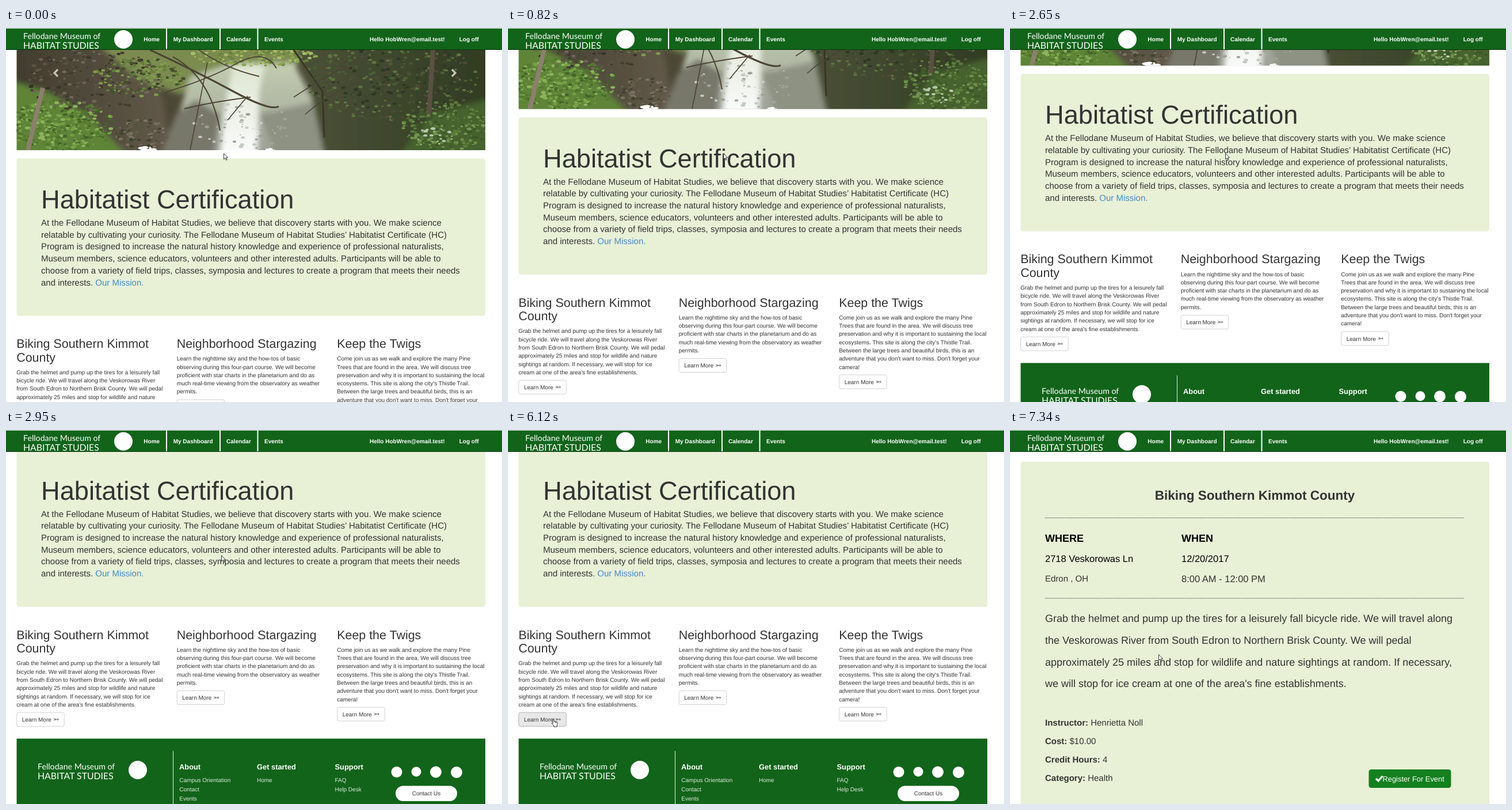
An HTML page that plays this animation: 862 px wide and 649 px high, repeating every 8000 ms.

```html
<!DOCTYPE html>
<html lang="en">
<head>
<meta charset="utf-8">
<title>Museum site tour</title>
<style>
  html, body { margin: 0; width: 100%; height: 100%; overflow: hidden; background: #fff; }
  svg { display: block; width: 862px; height: 649px; }
  text { font-family: "Liberation Sans", Arial, sans-serif; fill: #333; text-rendering: geometricPrecision; white-space: pre; }
  .bold { font-weight: 700; }
  .white { fill: #fff; }
  .pale { fill: #dfeadf; }
  .black { fill: #000; }
  .brand { font-family: Lato, sans-serif; fill: #fff; }
  .link { fill: #428bca; }
</style>
</head>
<body>
<svg id="stage" viewBox="0 0 862 649"></svg>
<script>
const GREEN = '#12641a', CREAM = '#e8f0d6', LOOP = 8000;

const text = (x, y, size, str, cls = '') =>
  `<text x="${x}" y="${y}" font-size="${size}" class="${cls}">${str}</text>`;
const lines = (x, y, size, step, rows, cls) =>
  rows.map((row, i) => text(x, y + i * step, size, row, cls)).join('');
const rect = (x, y, w, h, fill, extra = '') =>
  `<rect x="${x}" y="${y}" width="${w}" height="${h}" fill="${fill}" ${extra}/>`;
const dot = (x, y, r, fill = '#fff') => `<circle cx="${x}" cy="${y}" r="${r}" fill="${fill}"/>`;
const shape = (d, fill) => `<path d="${d}" fill="${fill}"/>`;
const stroke = (d, color, width, extra = '') =>
  `<path d="${d}" fill="none" stroke="${color}" stroke-width="${width}" ${extra}/>`;

let seed = 7;
const rnd = () => (seed = (seed * 16807) % 2147483647) / 2147483647;

// Elliptical cloud of small leaves
function leaves(cx, cy, rx, ry, count, colors) {
  let out = '';
  for (let i = 0; i < count; i++) {
    const a = rnd() * 2 * Math.PI, r = Math.sqrt(rnd());
    const x = cx + Math.cos(a) * r * rx, y = cy + Math.sin(a) * r * ry;
    const w = 1.2 + rnd() * 3;
    out += `<ellipse cx="${x.toFixed(1)}" cy="${y.toFixed(1)}" rx="${w.toFixed(1)}" ry="${(w * 0.6).toFixed(1)}" fill="${colors[i % colors.length]}"/>`;
  }
  return out;
}

function brand(x, y) {
  return text(x, y, 14.2, 'Fellodane Museum of', 'brand') +
    text(x, y + 17.2, 15.8, 'HABITAT STUDIES', 'brand') + dot(x + 174, y + 1, 16);
}

function photo() {
  const bark = '#4d4536';
  return `<g clip-path="url(#frame)">` +
    rect(19, 0, 814, 212, '#4c4836') +
    `<g filter="url(#soft)">` +
    shape('M0 20H190L270 110L290 225H0Z', 'url(#bank)') +
    shape('M150 20H520L500 85L390 85L300 115L225 85Z', '#7c8b50') +
    shape('M320 85L390 62L500 60L530 120L555 225H268L300 150Z', 'url(#water)') +
    shape('M395 62H450L440 110L436 225H372L380 140Z', 'url(#glow)') +
    shape('M440 150L530 130L555 225H470Z', '#8d9282') +
    shape('M268 225L295 150L330 125L372 150L360 225Z', '#77776a') +
    shape('M500 20H850V225H555L530 120Z', 'url(#shade)') +
    shape('M0 90L70 110L140 150L215 225H0Z', '#5f8437') +
    shape('M680 225L740 150L850 120V225Z', '#47622f') +
    `</g>` +
    leaves(150, 90, 120, 55, 240, ['#39332a', '#5d5344', '#70655a', '#443c2d']) +
    leaves(230, 85, 80, 34, 200, ['#627d3a', '#7f9b4d', '#42502d']) +
    leaves(430, 48, 110, 18, 200, ['#8ba64e', '#a9bc6c', '#6b833c']) +
    leaves(95, 170, 95, 45, 420, ['#75a044', '#52792e', '#8db35c', '#44632b']) +
    leaves(670, 90, 150, 70, 400, ['#4a5e33', '#2e3823', '#5f7440', '#4f4a38']) +
    leaves(765, 170, 75, 45, 260, ['#5a7d3a', '#3b5728', '#719350']) +
    leaves(235, 185, 45, 28, 100, ['#645c4c', '#40432f', '#7b7264']) +
    leaves(415, 170, 90, 40, 60, ['#c5cac3', '#9fa397']) +
    stroke('M38 212L64 104', '#8b806c', 8) +
    stroke('M735 150L742 38', '#5a5140', 8) +
    stroke('M553 190L550 110L500 38', '#3a3528', 3) +
    stroke('M250 38Q330 75 395 110T474 136', bark, 3.2) +
    stroke('M275 112Q350 90 400 62T470 70M290 50Q355 85 372 178M310 140Q360 128 425 120M335 38Q380 70 440 84', bark, 2) +
    stroke('M500 120Q560 80 640 40M520 150Q580 95 700 66M350 60L320 212M420 118L385 160', '#4a4335', 1.6) +
    leaves(740, 188, 45, 16, 22, ['#b9c8ae']) +
    leaves(246, 210, 15, 3, 24, ['#fff']) + leaves(459, 212, 9, 2, 10, ['#fff']) +
    `<circle cx="436" cy="182" r="3.5" fill="none" stroke="#fff" opacity=".7"/>` +
    stroke('M90 72L84 78L90 84', '#c4c4b8', 3.2) + stroke('M775 72L781 78L775 84', '#c4c4b8', 3.2) +
    `</g>`;
}

function button(x, y, id) {
  const m = x + 68;
  return `<rect id="${id}" x="${x}" y="${y}" width="82.5" height="24" rx="3" fill="#fff" stroke="#ccc" stroke-width=".9"/>` +
    text(x + 9, y + 15.8, 10, 'Learn More') +
    stroke(`M${m - 4} ${y + 10}l2 2l-2 2M${m - 2} ${y + 10}l2 2l-2 2M${m - 2} ${y + 12}h6M${m + 2.5} ${y + 10.2}l2.2 1.8l-2.2 1.8`, '#444', 0.8);
}

function card(x, titles, rows, buttonY, id) {
  const top = 577.3 + (titles.length - 1) * 23.6;
  return lines(x, 555, 21.43, 23.6, titles) + lines(x, top, 10, 14.29, rows) +
    button(x + 0.5, buttonY, id);
}

function footer() {
  return rect(18.5, 728, 814.5, 300, GREEN) + brand(55, 781.5) +
    rect(290, 749.5, 1, 200, '#e4ece4') +
    [[301, 'About'], [436, 'Get started'], [571.5, 'Support']]
      .map(([x, s]) => text(x, 781.5, 12.86, s, 'bold white')).join('') +
    lines(301.3, 803, 10, 16.4, ['Campus Orientation', 'Contact', 'Events'], 'pale') +
    text(436, 803, 10, 'Home', 'pale') +
    lines(571.5, 803, 10, 16.4, ['FAQ', 'Help Desk'], 'pale') +
    dot(679, 786, 9.5) + dot(713, 785.5, 8.5) + dot(747, 786, 10) + dot(783, 786.5, 10) +
    rect(677, 810, 107, 26.5, '#fff', 'rx="13.2"') + text(705.7, 826.6, 10, 'Contact Us');
}

function homePage() {
  return photo() + rect(18.5, 226.5, 814.5, 273, CREAM, 'rx="4.5"') +
    text(61, 313, 45.2, 'Habitatist Certification') +
    lines(61, 343, 15, 20.7, [
      'At the Fellodane Museum of Habitat Studies, we believe that discovery starts with you. We make science',
      'relatable by cultivating your curiosity. The Fellodane Museum of Habitat Studies’ Habitatist Certificate (HC)',
      'Program is designed to increase the natural history knowledge and experience of professional naturalists,',
      'Museum members, science educators, volunteers and other interested adults. Participants will be able to',
      'choose from a variety of field trips, classes, symposia and lectures to create a program that meets their needs',
      'and interests. <tspan class="link">Our Mission.</tspan>']) +
    card(18.2, ['Biking Southern Kimmot', 'County'], [
      'Grab the helmet and pump up the tires for a leisurely fall',
      'bicycle ride. We will travel along the Veskorowas River',
      'from South Edron to Northern Brisk County. We will pedal',
      'approximately 25 miles and stop for wildlife and nature',
      'sightings at random. If necessary, we will stop for ice',
      "cream at one of the area's fine establishments."], 682.7, 'more') +
    card(296.7, ['Neighborhood Stargazing'], [
      'Learn the nighttime sky and the how-tos of basic',
      'observing during this four-part course. We will become',
      'proficient with star charts in the planetarium and do as',
      'much real-time viewing from the observatory as weather',
      'permits.'], 645, 'more2') +
    card(575.2, ['Keep the Twigs'], [
      'Come join us as we walk and explore the many Pine',
      'Trees that are found in the area. We will discuss tree',
      'preservation and why it is important to sustaining the local',
      "ecosystems. This site is along the city's Thistle Trail.",
      'Between the large trees and beautiful birds, this is an',
      "adventure that you don't want to miss. Don't forget your",
      'camera!'], 673.5, 'more3') +
    footer();
}

function eventPage() {
  const rule = y => stroke(`M61 ${y}H790`, '#333', 1.2, 'stroke-dasharray="1.43 1.43"');
  const fact = ([name, value]) => `<tspan class="bold">${name}:</tspan> ${value}`;
  return rect(0, 38, 862, 611, '#fff') + rect(18.5, 55, 814.5, 620, CREAM, 'rx="4.5"') +
    `<g text-anchor="middle">${text(425.5, 120.5, 22.5, 'Biking Southern Kimmot County', 'bold')}</g>` +
    rule(152.5) + rule(292) +
    text(61, 193.5, 18, 'WHERE', 'bold black') + text(298, 193.5, 18, 'WHEN', 'bold black') +
    text(61, 229.3, 16.5, '2718 Veskorowas Ln', 'black') + text(298, 229.3, 16.5, '12/20/2017', 'black') +
    text(61, 263, 15, 'Edron , OH') + text(298, 264.3, 16.5, '8:00 AM - 12:00 PM') +
    lines(61, 333, 18, 37.8, [
      'Grab the helmet and pump up the tires for a leisurely fall bicycle ride. We will travel along',
      'the Veskorowas River from South Edron to Northern Brisk County. We will pedal',
      'approximately 25 miles and stop for wildlife and nature sightings at random. If necessary,',
      "we will stop for ice cream at one of the area's fine establishments."]) +
    lines(61, 513, 15, 32.1, [['Instructor', 'Henrietta Noll'], ['Cost', '$10.00'],
      ['Credit Hours', '4'], ['Category', 'Health']].map(fact)) +
    rect(623.5, 589, 143, 32, '#15801f', 'rx="4.3"') +
    stroke('M636 605L640 609L647.5 600.5', '#fff', 3.2) +
    text(647.5, 609.6, 12.86, 'Register For Event', 'white');
}

function navBar() {
  return rect(0, 0, 862, 38, GREEN) + rect(0, 0, 862, 1, '#dde3dd') + rect(0, 37, 862, 1, '#0a350f') +
    brand(30, 18.8) +
    [278, 371, 436.5].map(x => rect(x, 1, 2, 36, '#fff')).join('') +
    [[239.3, 'Home'], [290.7, 'My Dashboard'], [383, 'Calendar'], [449, 'Events'],
      [632, 'Hello HobWren@email.test!'], [787.7, 'Log off']]
      .map(([x, s]) => text(x, 23, 10, s, 'bold white')).join('');
}

const pointers = {
  arrow: '<path d="M.5 .7V10.8L2.8 8.7L4.5 12.3L6 11.6L4.4 8.1H7.6Z" fill="#fff" stroke="#222" stroke-width=".9"/>',
  beam: stroke('M.5 .5H2.5L3 1L3.5 .5H5.5M3 1V12M.5 12.5H2.5L3 12L3.5 12.5H5.5', '#222', 1),
  hand: '<path d="M3.2 9V1.6Q4.2 .2 5.2 1.6V5.6L10 6.6Q11.3 7 11.2 8.5L10.3 12V15H4.6V13L.8 8.8Q1 7.2 3.2 9ZM7 6V8M9 6.4V8.4" fill="#fff" stroke="#222" stroke-width=".9"/>'
};

const stage = document.getElementById('stage');
stage.innerHTML = `<defs>
  <clipPath id="frame"><rect x="18.5" y="0" width="814.5" height="212"/></clipPath>
  <filter id="soft"><feGaussianBlur stdDeviation="5"/></filter>
  <linearGradient id="bank"><stop stop-color="#3f3b2c"/><stop offset="1" stop-color="#62594a"/></linearGradient>
  <linearGradient id="shade"><stop stop-color="#4d5238"/><stop offset="1" stop-color="#2f3a22"/></linearGradient>
  <linearGradient id="water" x2="0" y2="1"><stop stop-color="#c3cdb0"/><stop offset="1" stop-color="#9a9d95"/></linearGradient>
  <linearGradient id="glow" x2="0" y2="1"><stop stop-color="#dde5d0"/><stop offset="1" stop-color="#fbfcfd"/></linearGradient>
  </defs><g id="home">${homePage()}</g><g id="event">${eventPage()}</g>${navBar()}` +
  Object.entries(pointers).map(([id, art]) => `<g id="${id}">${art}</g>`).join('');

const get = id => document.getElementById(id);
const home = get('home'), detail = get('event'), more = get('more');

const scrolls = [[0, 0], [550, 14], [670, 66], [820, 71.5], [1690, 128], [1840, 142.9],
  [2650, 146.7], [2800, 190.5], [2950, 192.5]];
const moves = [[0, 'arrow', 378, 217], [250, 'arrow', 375, 217], [400, 'arrow', 374, 217],
  [4610, 'beam', 353, 217], [4760, 'arrow', 296, 286], [4880, 'arrow', 150, 425],
  [5000, 'arrow', 80, 486], [5150, 'arrow', 79, 489], [5300, 'hand', 73, 507],
  [5570, 'hand', 72, 506], [5690, 'hand', 71, 504], [5810, 'hand', 73, 502],
  [5960, 'hand', 74, 501], [6120, 'hand', 75, 500], [6830, 'arrow', 86, 494],
  [6970, 'arrow', 112, 472], [7090, 'arrow', 178, 420], [7210, 'arrow', 236, 386],
  [7340, 'arrow', 258, 389]];
const at = (steps, t) => steps.filter(s => s[0] <= t).pop();

function draw(now) {
  const t = now % LOOP;
  home.setAttribute('transform', `translate(0 ${-at(scrolls, t)[1]})`);
  home.style.display = t < 6390 ? '' : 'none';
  detail.style.opacity = t < 6260 ? 0 : t < 6390 ? 0.5 : 1;
  const hover = t >= 5300;
  more.setAttribute('fill', hover ? '#e8e8e8' : '#fff');
  more.setAttribute('stroke', hover ? '#adadad' : '#ccc');
  const [, kind, x, y] = at(moves, t);
  for (const id in pointers) get(id).style.display = id === kind ? '' : 'none';
  get(kind).setAttribute('transform', `translate(${x} ${y})`);
}

const start = performance.now();
function tick() {
  draw(performance.now() - start);
  requestAnimationFrame(tick);
}
tick();
</script>
</body>
</html>
```
